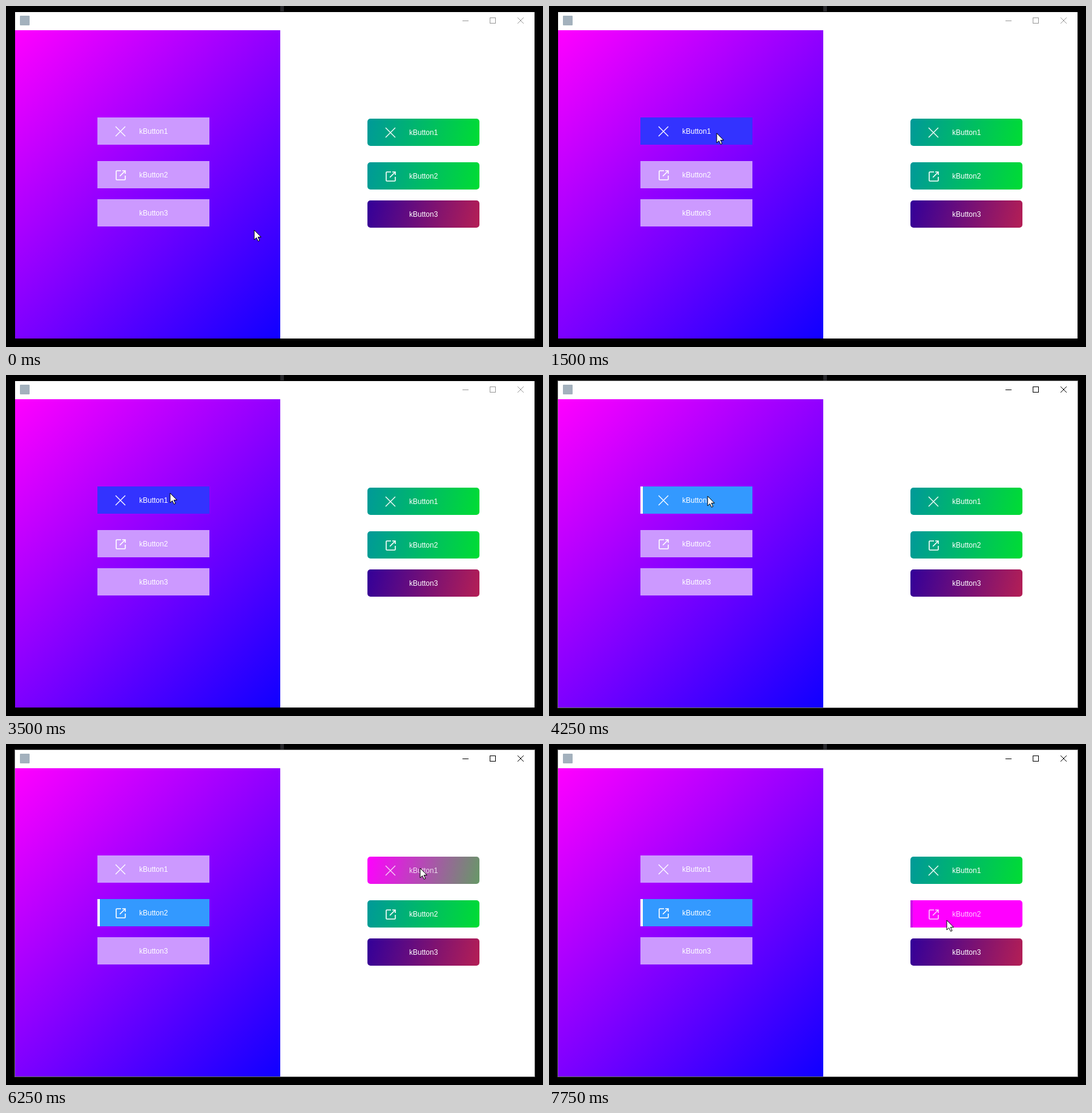
Write an HTML page that moves like this. It is 887 by 563 pixels and loops after 8 s.

```html
<!DOCTYPE html>
<html lang="en">
<head>
<meta charset="utf-8">
<title>Buttons</title>
<style>
  html, body { margin: 0; width: 100%; height: 100%; overflow: hidden; background: #000; }
  svg { display: block; }
  text { font: 12px "Liberation Sans", Arial, sans-serif; fill: #fff; }
</style>
</head>
<body>
<svg id="stage" width="887" height="563" viewBox="0 0 887 563">
  <defs>
    <linearGradient id="panel" gradientUnits="userSpaceOnUse" x1="15" y1="40" x2="515" y2="549">
      <stop stop-color="#f0f"/><stop offset="1" stop-color="#00f"/>
    </linearGradient>
  </defs>
  <rect width="887" height="563"/>
  <rect x="453" width="6" height="9" fill="#26262a"/>
  <rect id="frame" x="14" y="9" width="860" height="541" fill="#6a6a6a"/>
  <rect x="15" y="10" width="858" height="539" fill="#fff"/>
  <rect x="15" y="40" width="438" height="509" fill="url(#panel)"/>
  <rect x="23" y="16" width="16" height="16" rx="1" fill="#a3b1bd"/>
  <g id="caption" fill="none">
    <path d="M754 24.5h10M799.5 19.5h9v9h-9z" shape-rendering="crispEdges"/>
    <path d="M845 19l10 10M855 19l-10 10"/>
  </g>
  <g id="buttons"></g>
  <path id="cursor" d="M.5 .5V16.5L4.2 13L7 18.8L9.4 17.7L6.8 12H11.8Z" fill="#fff" stroke="#000"/>
</svg>
<script>
const NS = "http://www.w3.org/2000/svg";
const $ = id => document.getElementById(id);

function add(parent, tag, attrs) {
  const el = document.createElementNS(NS, tag);
  for (const k in attrs) el.setAttribute(k, attrs[k]);
  return parent.appendChild(el);
}

const icons = {
  close: ["M0 0L16 16M16 0L0 16", 1.3],
  open: ["M9 1H2Q1 1 1 2V15Q1 16 2 16H15Q16 16 16 15V9M7 10L15.5 1.5M11 1H16V6", 1.6]
};

// Fill pairs: normal, hover, selected
const flat = [["#c9f", "#c9f"], ["#33f", "#33f"], ["#39f", "#39f"]];
const green = [["#099", "#0d3"], ["#f0f", "#696"], ["#f0f", "#f0f"]];
const wine = [["#309", "#b41f55"]];

function makeButton(id, x, y, label, icon, fills, round) {
  const g = add($("buttons"), "g", { transform: `translate(${x} ${y})` });
  const grad = add(g, "linearGradient", {
    id, gradientUnits: "userSpaceOnUse", x1: 0, y1: 0, x2: 185, y2: 45
  });
  const stops = [0, 1].map(offset => add(grad, "stop", { offset }));
  add(g, "rect", { width: 185, height: 45, rx: round ? 5 : 0, fill: `url(#${id})` });
  const bar = add(g, "rect", { width: 4, height: 45, fill: round ? "#cc10e8" : "#fff" });
  const face = add(g, "g", {});
  if (icon) {
    const [d, width] = icons[icon];
    add(face, "path", {
      d, transform: "translate(30 15)", fill: "none", stroke: "#fff", "stroke-width": width
    });
  }
  add(face, "text", { x: 69, y: 27 }).textContent = label;
  return state => {
    stops.forEach((s, i) => s.setAttribute("stop-color", fills[state][i]));
    bar.setAttribute("visibility", state === 2 ? "visible" : "hidden");
    face.setAttribute("opacity", round && state ? 0.8 : 1);
  };
}

const buttons = [
  makeButton("l1", 151, 184, "kButton1", "close", flat, false),
  makeButton("l2", 151, 256, "kButton2", "open", flat, false),
  makeButton("r1", 597, 186, "kButton1", "close", green, true),
  makeButton("r2", 597, 258, "kButton2", "open", green, true)
];
makeButton("l3", 151, 319, "kButton3", "", flat, false)(0);
makeButton("r3", 597, 321, "kButton3", "", wine, true)(0);

// Time, cursor x, cursor y, states of l1 l2 r1 r2
const steps = [
  [0, 410, 370, "0000"],
  [250, 405, 343, "0000"],
  [500, 397, 249, "0000"],
  [750, 354, 166, "0000"],
  [1000, 297, 180, "0000"],
  [1250, 285, 210, "1000"],
  [1500, 277, 210, "1000"],
  [2000, 278, 263, "0100"],
  [2250, 284, 267, "0100"],
  [3500, 271, 195, "1000"],
  [4000, 271, 195, "2000"],
  [4250, 262, 200, "2000"],
  [4500, 269, 216, "2000"],
  [4750, 247, 263, "2100"],
  [5000, 255, 264, "2100"],
  [5250, 247, 264, "0200"],
  [5750, 680, 218, "0210"],
  [6250, 684, 205, "0210"],
  [6500, 686, 202, "0220"],
  [6750, 661, 246, "0220"],
  [7000, 657, 292, "0221"],
  [7250, 657, 299, "0221"],
  [7500, 657, 299, "0202"],
  [7750, 657, 291, "0202"]
];
const LOOP = 8000, ACTIVE_FROM = 4000;
let shown = null;

function draw(now) {
  const t = now % LOOP;
  const step = steps.findLast(s => s[0] <= t);
  if (step !== shown) {
    const [time, x, y, states] = step;
    const active = time >= ACTIVE_FROM;
    $("cursor").setAttribute("transform", `translate(${x - 0.5} ${y - 0.5})`);
    buttons.forEach((set, i) => set(+states[i]));
    $("caption").setAttribute("stroke", active ? "#000" : "#999");
    $("frame").setAttribute("visibility", active ? "visible" : "hidden");
    shown = step;
  }
}

function tick() {
  draw(performance.now());
  requestAnimationFrame(tick);
}
tick();
</script>
</body>
</html>
```
